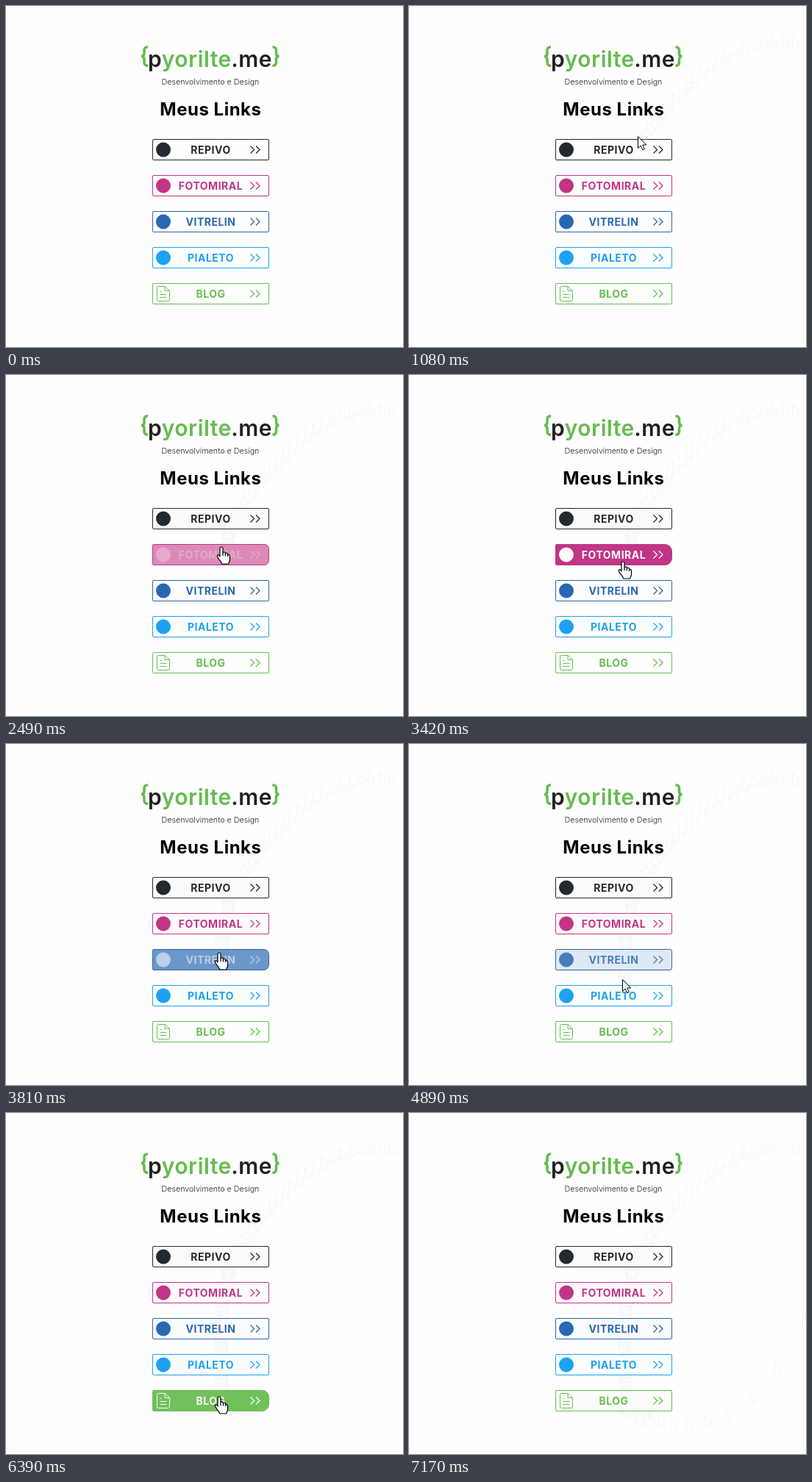
Animation of 540x464 px, one loop 7.8 s. Source, as an HTML page:

```html
<!DOCTYPE html>
<html lang="pt-BR">
<head>
<meta charset="utf-8">
<title>Meus Links</title>
<style>
  html, body { margin: 0; width: 100%; height: 100%; overflow: hidden; background: #fefefe; }
  body { position: relative; font-family: Inter, "Open Sans", sans-serif; }
  .layer { position: absolute; left: 0; top: 0; pointer-events: none; }
  .link {
    position: absolute; left: 199px; box-sizing: border-box; width: 159px; height: 29px;
    border: 1px solid var(--color); border-radius: 2px var(--radius) var(--radius) 2px;
    background: color-mix(in srgb, var(--color) var(--fill), #fefefe);
    color: color-mix(in srgb, #fff var(--hover), var(--color));
    font-size: 14px; font-weight: 700; line-height: 28px;
    letter-spacing: .5px; text-align: center;
  }
  .link svg { position: absolute; left: -1px; top: -1px; fill: none; stroke: currentColor; }
  .link .badge { fill: currentColor; stroke: none; }
  .link .chevrons { stroke-width: 1.3; }
</style>
</head>
<body>
<svg class="layer" width="540" height="464">
  <g fill="none" stroke="#64bc4e" stroke-width="3.6">
    <path id="brace" d="M193 55.8c-4 0-5 1.7-5 5v3.2c0 3-1 4.5-4 4.5 3 0 4 1.500 4 4.500v3.200c0 3.300 1 5 5 5"/>
    <use href="#brace" transform="matrix(-1 0 0 1 555.5 0)"/>
  </g>
  <g font-size="30" font-weight="600" letter-spacing=".5" fill="#231f20">
    <text x="193" y="82.500">p<tspan fill="#64bc4e">yorilte</tspan></text>
    <text x="362" y="82.500" text-anchor="end">.me</text>
  </g>
  <g text-anchor="middle">
    <text x="278" y="107" font-size="10.7" font-weight="300" fill="#222">Desenvolvimento e Design</text>
    <text x="278.4" y="149" font-size="24" font-weight="700" letter-spacing=".5">Meus Links</text>
  </g>
</svg>

<svg class="layer" width="540" height="464">
  <defs>
    <path id="arrow" d="M.5.5v16l3.700-3.500 2.500 5.700 2.600-1.100-2.500-5.600h5z" fill="#fff" stroke="#000"/>
    <g id="hand" stroke="#000" stroke-width="1.2" stroke-linejoin="round">
      <path fill="#fff" d="M-2 13V2a2 2 0 0 1 4 0v6c0-1.600 3.400-1.400 3.400.4v.8c.4-1.500 3.300-1.100 3.300.7v1c.6-1 2.800-.6 2.800 1.200v5.400c0 2-1.600 3-1.600 5.500h-9.400c0-2-2.200-4-4-6.600-1-1.500-2.300-3-2.300-4.200 0-1.400 2-1.700 2.800-.6z"/>
      <path d="M2 8v4M5.400 9v3.500M8.700 10v3"/>
    </g>
  </defs>
  <g id="trail" opacity=".03"></g>
</svg>

<main id="links"></main>

<svg class="layer" width="540" height="464"><use id="cursor"/></svg>

<script>
const LOOP = 7800, STEP = 30, FADE = 300, FIRST = 420, LAST = 7050;
const LEFT = 199, TOP = 181, WIDTH = 159, HEIGHT = 29, PITCH = 49;

const links = [
  { label: 'REPIVO', color: '#24292e' },
  { label: 'FOTOMIRAL', color: '#c13584' },
  { label: 'VITRELIN', color: '#2867b2' },
  { label: 'PIALETO', color: '#1da1f2' },
  { label: 'BLOG', color: '#67bd51', page: true },
];

const settle = p => 1 - (1 - p) ** 1.8;
const launch = p => p ** 3;

// The pointer rests on each link in turn; "via" bends a move into a curve.
const entry = [521, 39];
const moves = [
  { from: FIRST, to: 1200, via: [415, 22], end: [303, 188], ease: settle },
  { from: 1920, to: 2670, end: [292, 238], ease: settle },
  { from: 3300, to: 3870, end: [290, 285], ease: settle },
  { from: 4470, to: 5340, end: [290, 336], ease: settle },
  { from: 5730, to: 6510, end: [290, 388], ease: settle },
  { from: 6570, to: LAST, via: [430, 475], end: [535, 275], ease: launch },
];

function pointAt(t) {
  const i = moves.findLastIndex(m => m.from <= t);
  const { from, to, via, end, ease } = moves[i];
  const begin = i ? moves[i - 1].end : entry;
  const u = ease(Math.min(1, (t - from) / (to - from)));
  return begin.map((a, axis) => {
    const b = end[axis], mid = via ? via[axis] : (a + b) / 2;
    return Math.round((1 - u) ** 2 * a + 2 * u * (1 - u) * mid + u * u * b);
  });
}

const badge = '<circle class="badge" cx="15" cy="14.5" r="10"/>';
const page = '<path d="M17 4.5H8.500a2 2 0 0 0-2 2v16a2 2 0 0 0 2 2h13a2 2 0 0 0 2-2v-12zv6h6M10.500 11.500h2M10.500 15.500h9M10.500 19.500h9"/>';
const chevrons = '<path class="chevrons" d="M133.5 9.500l5 5-5 5M141 9.500l5 5-5 5"/>';

const box = document.getElementById('links');
links.forEach((link, i) => {
  link.top = TOP + PITCH * i;
  const el = link.el = document.createElement('div');
  el.className = 'link';
  el.style.top = link.top + 'px';
  el.style.setProperty('--color', link.color);
  el.innerHTML = `${link.label}<svg width="${WIDTH}" height="${HEIGHT}">${link.page ? page : badge}${chevrons}</svg>`;
  box.append(el);
});

function linkAt([x, y]) {
  if (x < LEFT || x >= LEFT + WIDTH) return;
  return links.find(l => y >= l.top && y < l.top + HEIGHT);
}

// Each link is crossed once, so its hover is a single span of time.
for (let t = FIRST; t <= LAST; t += 10) {
  const link = linkAt(pointAt(t));
  if (!link) continue;
  link.enter ??= t;
  link.leave = t + 10;
}

// cubic-bezier(.25, .1, .25, 1)
function fade(p) {
  if (p <= 0) return 0;
  if (p >= 1) return 1;
  const curve = (u, a, b) => 3 * u * (1 - u) * ((1 - u) * a + u * b) + u ** 3;
  let low = 0, high = 1;
  for (let i = 0; i < 18; i++) {
    const mid = (low + high) / 2;
    if (curve(mid, .25, .25) < p) low = mid; else high = mid;
  }
  return curve(low, .1, 1);
}

function placePointer(use, t) {
  const point = pointAt(t);
  use.setAttribute('href', linkAt(point) ? '#hand' : '#arrow');
  use.setAttribute('transform', `translate(${point})`);
}

const trail = document.getElementById('trail'), ghosts = [];
for (let t = FIRST; t <= LAST; t += STEP) {
  const use = document.createElementNS('http://www.w3.org/2000/svg', 'use');
  placePointer(use, t);
  trail.append(use);
  ghosts.push({ use, t });
}

const cursor = document.getElementById('cursor');
const show = (el, on) => { el.style.display = on ? '' : 'none'; };

function draw(t) {
  for (const { el, enter, leave } of links) {
    const hover = fade((t - enter) / FADE) - fade((t - leave) / FADE);
    const residue = t > enter ? .015 : 0;
    el.style.setProperty('--hover', hover * 100 + '%');
    el.style.setProperty('--fill', Math.max(hover, residue) * 100 + '%');
    el.style.setProperty('--radius', 2 + 8 * hover + 'px');
  }
  for (const g of ghosts) show(g.use, g.t < t);
  const visible = t >= FIRST && t <= LAST;
  show(cursor, visible);
  if (visible) placePointer(cursor, t);
}

const start = performance.now();
function tick() {
  const t = (performance.now() - start) % LOOP;
  draw(Math.floor(t / STEP) * STEP);
  requestAnimationFrame(tick);
}
tick();
</script>
</body>
</html>
```
